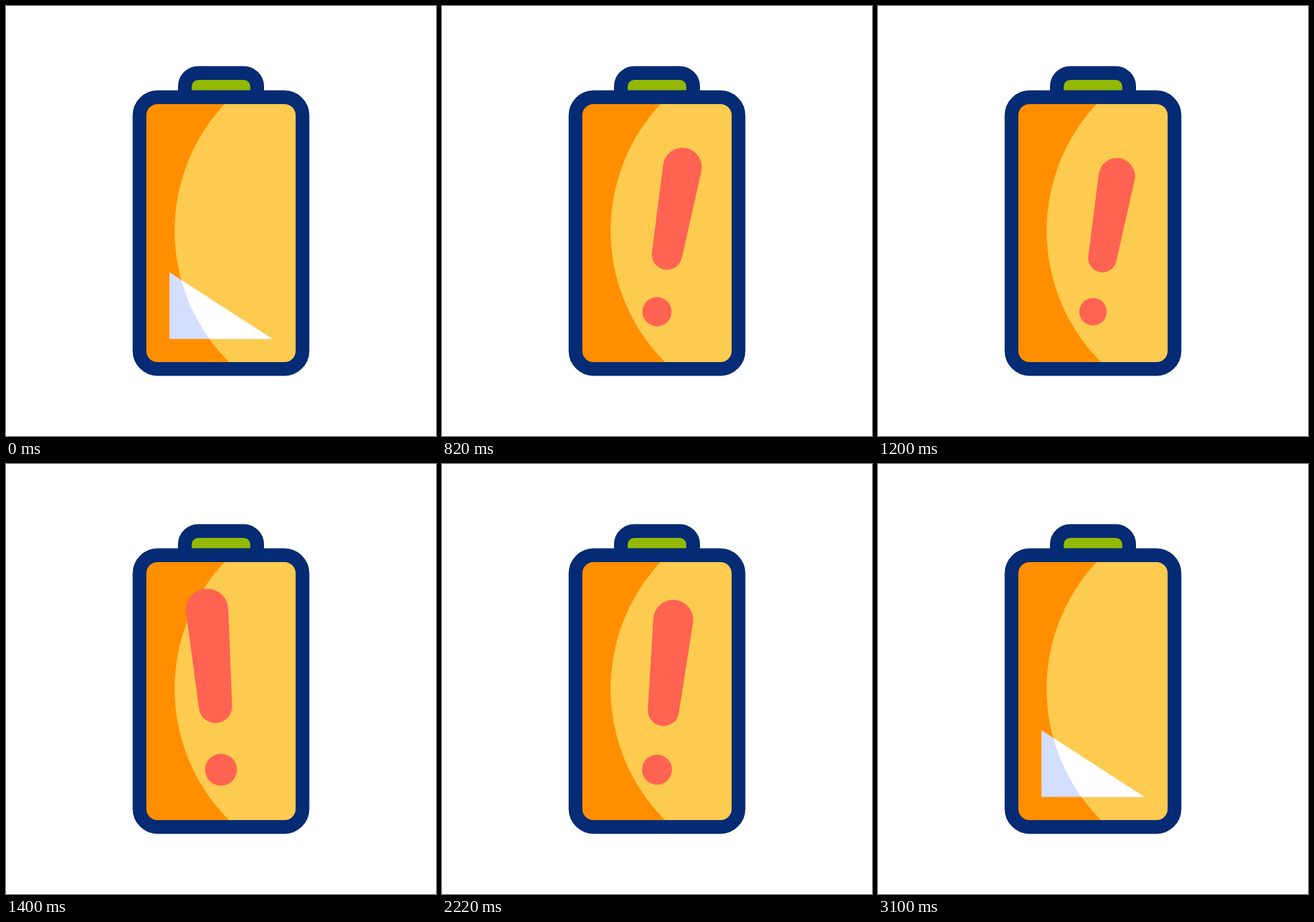
An HTML page for the animation above (3420 ms loop, 640 by 640 pixels).

```html
<!DOCTYPE html>
<html lang="en">
<head>
<meta charset="utf-8">
<title>Low battery</title>
<style>
  html, body { margin: 0; width: 100%; height: 100%; overflow: hidden; background: #fff; }
  svg { display: block; width: 100vw; height: 100vh; }
</style>
</head>
<body>
<svg viewBox="0 0 640 640">
  <defs>
    <clipPath id="inside"><rect x="200" y="137" width="240" height="402" rx="26"/></clipPath>
    <clipPath id="lit"><circle cx="527.8" cy="334.5" r="276.8"/></clipPath>
  </defs>
  <path d="M266.2 136V119.7a20 20 0 0 1 20-20h67.6a20 20 0 0 1 20 20V136z"
        fill="#92b802" stroke="#042b74" stroke-width="20.4"/>
  <g clip-path="url(#inside)">
    <rect x="198" y="135" width="244" height="406" fill="#ff8f00"/>
    <circle cx="527.8" cy="334.5" r="276.8" fill="#fdcb50"/>
  </g>
  <rect x="198.7" y="135.7" width="242.6" height="404.6" rx="27"
        fill="none" stroke="#042b74" stroke-width="20.4"/>
  <path class="level" fill="#d4deff"/>
  <path class="level" fill="#fff" clip-path="url(#lit)"/>
  <g id="mark" fill="#ff6352">
    <path d="M290 230A30.1 30.1 0 1 1 350 230L343.6 365A23.6 23.6 0 0 1 296.4 365Z"/>
    <circle cx="320" cy="455" r="22.6"/>
  </g>
</svg>
<script>
const LOOP = 3420;
const BASE = 495.5;
const levels = document.querySelectorAll('.level');
const mark = document.getElementById('mark');

function bezier(x1, y1, x2, y2) {
  const at = (a, b, s) => 3 * a * s * (1 - s) ** 2 + 3 * b * s * s * (1 - s) + s ** 3;
  return x => {
    if (x <= 0) return 0;
    if (x >= 1) return 1;
    let lo = 0, hi = 1;
    for (let i = 0; i < 24; i++) {
      const mid = (lo + hi) / 2;
      if (at(x1, x2, mid) < x) lo = mid; else hi = mid;
    }
    return at(y1, y2, lo);
  };
}

const ease = bezier(0.25, 0.1, 0.25, 1);
const easeIn = bezier(0.42, 0, 1, 1);
const easeGrow = bezier(0.42, 0, 0.8, 1);

// time, scale, angle
const poses = [
  [650, 0, 0], [820, 0.96, 10], [1000, 1.1, -10], [1200, 0.9, 10],
  [1400, 1.05, -5], [1600, 0.95, 5], [1800, 1, 0],
  [2000, 1, 0], [2150, 1.1, -10], [2290, 0.96, 10], [2440, 0, 0]
];

function poseAt(t) {
  const next = poses.findIndex(p => p[0] > t);
  if (next < 1) return [0, 0];
  const [from, to] = [poses[next - 1], poses[next]];
  const k = ease((t - from[0]) / (to[0] - from[0]));
  return [1, 2].map(i => from[i] + (to[i] - from[i]) * k);
}

function levelAt(t) {
  return t < 1800 ? 1 - easeIn((t - 60) / 568) : easeGrow((t - 2580) / 520);
}

function render(t) {
  const level = levelAt(t);
  for (const shape of levels) {
    shape.setAttribute('d', `M243.3 ${BASE - 99.2 * level}V${BASE}H396.5Z`);
    shape.style.display = level > 0 ? '' : 'none';
  }
  const [scale, angle] = poseAt(t);
  mark.style.display = scale > 0 ? '' : 'none';
  mark.setAttribute('transform',
    `translate(320 455) rotate(${angle}) scale(${scale}) translate(-320 -455)`);
}

const start = performance.now();
function tick() {
  render((performance.now() - start) % LOOP);
  requestAnimationFrame(tick);
}
tick();
</script>
</body>
</html>
```
